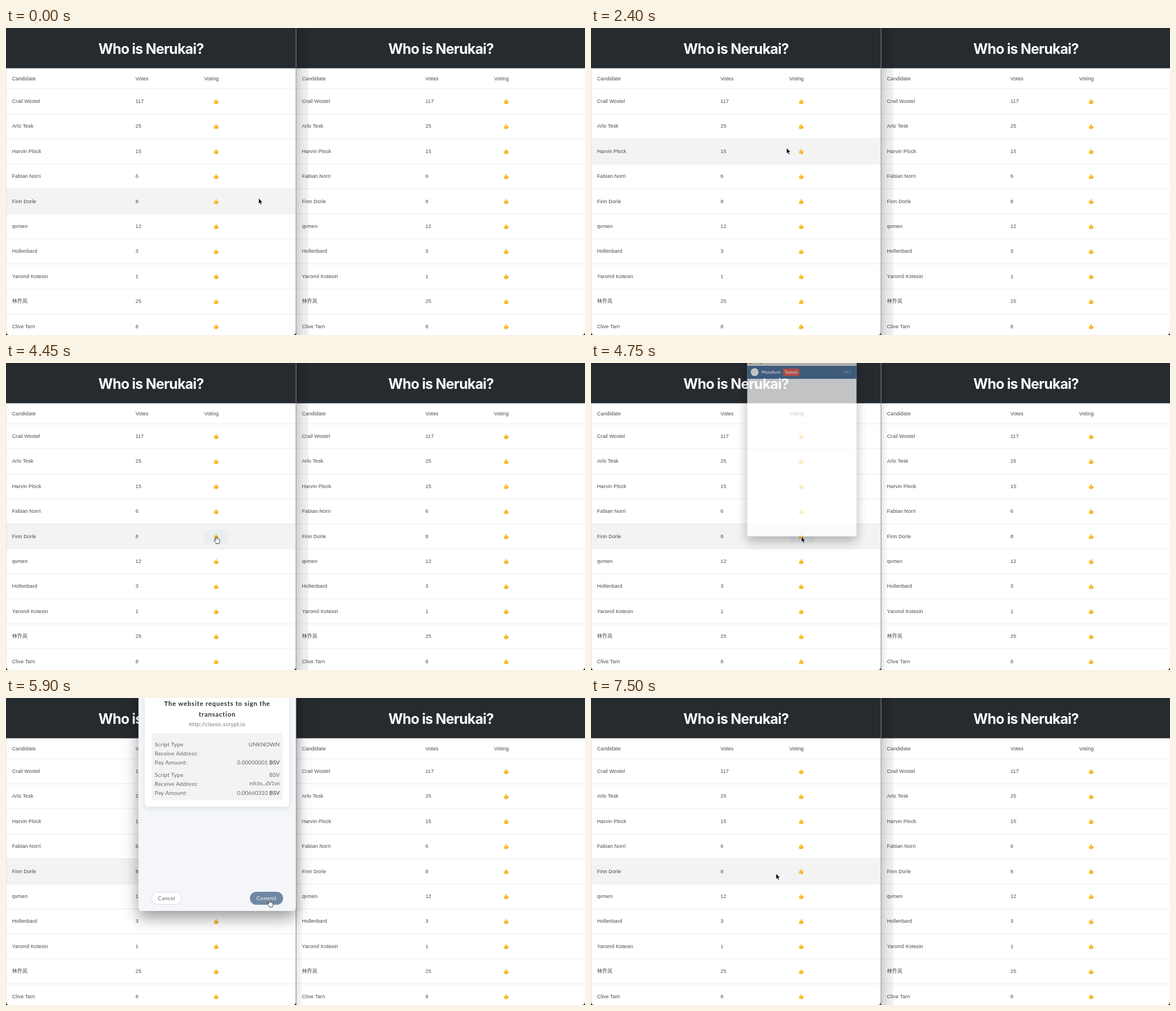
Recreate the animation shown at these times as an HTML page. Size 1028 by 545 pixels, loop 8 s.

```html
<!DOCTYPE html>
<html lang="en">
<head>
<meta charset="utf-8">
<title>Voting demo</title>
<style>
html, body { margin: 0; width: 100%; height: 100%; overflow: hidden; background: #fff; }
svg { display: block; width: 100vw; height: 100vh; }
.title { font: 700 25px Inter, sans-serif; letter-spacing: -.8px; fill: #fff; text-anchor: middle; }
.cell { font: 9px "Liberation Sans", "Noto Sans CJK SC", "Noto Sans CJK", sans-serif; letter-spacing: .12px; fill: #484848; }
.pop { font: 10px Lato, sans-serif; letter-spacing: .2px; fill: #666; }
.pop .head { font-weight: 700; font-size: 11.5px; letter-spacing: .72px; fill: #2c2f36; }
.mid { text-anchor: middle; }
.end { text-anchor: end; letter-spacing: 0; }
#frame { filter: drop-shadow(0 12px 14px rgba(0, 0, 0, .4)); }
#card { filter: drop-shadow(0 3px 5px rgba(60, 70, 100, .13)); }
</style>
</head>
<body>
<svg viewBox="0 0 1028 545" preserveAspectRatio="none">
  <defs>
    <linearGradient id="shade">
      <stop offset="0" stop-opacity=".18"/>
      <stop offset=".5" stop-opacity=".09"/>
      <stop offset="1" stop-opacity=".05"/>
    </linearGradient>
    <g id="thumb" transform="translate(0 .3) scale(.9)">
      <path d="M-4.4-.3 Q-2.6-.8-1.4-2.6 Q-.5-4-.5-4.8 Q.9-5.2 1.2-3.6 Q1.2-2.2.8-1.1 H3.4 Q4.6-.9 4.2.3 Q4.8 1 4.1 1.9 Q4.4 2.8 3.6 3.3 Q3.6 4.6 2.2 4.6 H-1.5 Q-3 4.3-4.4 3.9Z" fill="#fdc02f"/>
      <path d="M.6.4H4M.6 2H3.9M.6 3.5H3.4M-4.2 3.9Q-2 4.6 2 4.7" fill="none" stroke="#e8921c" stroke-width=".6"/>
    </g>
  </defs>

  <rect width="1028" height="545" fill="#fff"/>
  <rect id="hover" width="514" height="44.4" fill="#f3f3f3"/>
  <rect id="focus" x="352.5" y="296.5" width="41.5" height="23" fill="#e8eef2"/>
  <g id="pages"></g>
  <rect id="cast" x="516" height="545" fill="url(#shade)"/>
  <path d="M.5 71.5V545" stroke="#dedede"/>
  <path d="M515 0V71.5" stroke="#6d7075" stroke-width="1.4"/>
  <path d="M515 71.5V545" stroke="#999" stroke-width="1.4"/>
  <path d="M0 539Q0 545 6 545H0ZM515 539Q515 545 509 545H515ZM1028 539Q1028 545 1022 545H1028Z" fill="#111"/>

  <g id="popup" class="pop">
    <rect id="frame" x="235.5" y="-84" width="279" height="462" rx="6" fill="#fff"/>
    <rect x="235.5" y="-84" width="279" height="30" rx="6" fill="#e4e4e4"/>
    <circle cx="243.5" cy="-66" r="4" fill="#f45d55"/>
    <circle cx="256.5" cy="-66" r="4" fill="#f6bd3b"/>
    <circle cx="269.5" cy="-66" r="4" fill="#43c645"/>
    <rect x="235.5" y="-57" width="279" height="33" fill="#486e9b"/>
    <circle cx="254.5" cy="-41" r="10" fill="#fff"/>
    <text x="272" y="-37" style="font-weight:700;font-size:11px;fill:#fff">Mondivet</text>
    <rect x="327" y="-50" width="42" height="19" rx="5" fill="#e8594f"/>
    <text x="348" y="-37" class="mid" style="font-weight:700;font-size:10px;fill:#fff">Testnet</text>
    <text x="500" y="-38" class="end" style="font-size:8px;fill:#c3d0df">0.2.2</text>
    <g id="form">
      <path d="M235.5-24H514.5V372Q514.5 378 508.5 378H241.5Q235.5 378 235.5 372Z" fill="#f4f6fa"/>
      <rect id="card" x="246.5" y="-14" width="256.5" height="207" rx="6" fill="#fff"/>
      <text x="375" y="14" class="head mid">The website requests to sign the</text>
      <text x="375" y="33" class="head mid">transaction</text>
      <text x="375" y="50" class="mid" fill="#777">http://classic.scrypt.io</text>
      <rect x="258.5" y="62" width="233" height="119.5" rx="3" fill="#f3f3f3"/>
      <g id="lines"></g>
      <rect x="258.5" y="344.5" width="53" height="22" rx="11" fill="#fff" stroke="#dcdee2"/>
      <text x="285" y="359" class="mid">Cancel</text>
      <rect x="433" y="344" width="59" height="23" rx="11.5" fill="#7088a4"/>
      <text x="462.5" y="359" class="mid" style="fill:#f4f6f9">Commit</text>
    </g>
  </g>

  <g id="ring">
    <circle id="wave" cx="373" cy="308" fill="#dfeafa" fill-opacity=".4" stroke="#7eaceb" stroke-width="2"/>
    <circle cx="373" cy="308" r="9.5" fill="#9fb0c6" fill-opacity=".45"/>
  </g>
  <g id="pointer">
    <path id="arrow" d="M0 0V10.4L2.3 8.3 3.9 11.9 5.7 11.1 4.1 7.6H7.3Z" fill="#000" stroke="#fff" stroke-width=".8"/>
    <path id="hand" d="M-1.3.9Q-.2-.8.9.9V4.2Q2 3.3 2.8 4.6 4 3.9 4.6 5.1 6.2 4.7 6.1 6.4V8.6Q5.9 10.2 5 11.2V12.7H-.6V11.5Q-2.6 9.4-4 7.2-4.4 5.4-2.7 5.8L-1.3 7Z" fill="#fff" stroke="#222" stroke-width=".9"/>
  </g>
</svg>
<script>
const $ = id => document.getElementById(id);
const clamp = v => Math.max(0, Math.min(1, v));
const span = (t, a, b) => clamp((t - a) / (b - a));
const smooth = p => p * p * (3 - 2 * p);
const show = (id, on) => $(id).setAttribute('opacity', Number(on));

const TOP = 108, ROW = 44.4;
const people = [
  ['Crail Wostel', 117], ['Arlo Tesk', 25], ['Harvin Plock', 15], ['Fabian Norri', 6],
  ['Finn Dorle', 8], ['qvmen', 12], ['Hollenbard', 3], ['Yaromil Kotesin', 1],
  ['林乔岚', 25], ['Clive Tarn', 8]
];

const cell = (x, y, s) => `<text class="cell" x="${x}" y="${y}">${s}</text>`;
const rule = y => `<path d="M0 ${y}H514" stroke="#ebebeb"/>`;

function page(x) {
  const rows = people.map(([name, votes], i) => {
    const y = 130 + i * ROW;
    return rule(TOP + i * ROW) + cell(10.7, y + 3, name) + cell(230, y + 3, votes) +
      `<use href="#thumb" x="373.3" y="${y}"/>`;
  });
  return `<g transform="translate(${x})"><rect width="515" height="71.5" fill="#262b30"/>
    <text class="title" x="257.5" y="45.5">Who is Nerukai?</text>` +
    cell(10.7, 93, 'Candidate') + cell(230, 93, 'Votes') + cell(352, 93, 'Voting') +
    rows.join('') + '</g>';
}
$('pages').innerHTML = page(0) + page(514.8);

const pay = n => n + ' <tspan fill="#333">BSV</tspan>';
$('lines').innerHTML = [
  [86, 'Script Type', 'UNKNOWN'],
  [102, 'Receive Address:', ''],
  [117.5, 'Pay Amount:', pay('0.00000001')],
  [140, 'Script Type', 'BSV'],
  [156, 'Receive Address:', '<tspan font-size="8.5" dy="-1.5">mfc6x...dV1on</tspan>'],
  [171.5, 'Pay Amount:', pay('0.00660310')]
].map(([y, a, b]) => `<text x="264" y="${y}">${a}</text><text class="end" x="486" y="${y}">${b}</text>`).join('');

// Pointer stops: time, x, y
const path = [
  [50, 448.5, 302], [300, 443.5, 280], [650, 443.5, 280], [850, 441.5, 275.5],
  [1000, 441.5, 275.5], [1250, 428, 262], [1450, 428, 262], [1650, 351, 183.5],
  [2250, 345, 205], [2300, 345, 205], [2900, 373.5, 308], [5100, 373.5, 308],
  [5700, 468, 358.5], [6600, 468, 358.5], [7050, 335, 340], [7300, 335, 340], [7500, 328.5, 311.5]
];

function pointerAt(t) {
  const i = path.findIndex(k => k[0] > t);
  if (i === 0) return path[0].slice(1);
  if (i < 0) return path[path.length - 1].slice(1);
  const [a, x, y] = path[i - 1], [b, u, v] = path[i];
  const p = smooth(span(t, a, b));
  return [x + (u - x) * p, y + (v - y) * p];
}

function draw(t) {
  const [x, y] = pointerAt(t);
  $('pointer').setAttribute('transform', `translate(${x} ${y})`);
  const hand = t > 2700 && t < 4600 || t > 5550 && t < 6000;
  show('hand', hand);
  show('arrow', !hand);

  // The hovered row stays put while the popup has the focus
  const row = t > 2900 && t < 6600 ? 4 : Math.floor((y - TOP) / ROW);
  $('hover').setAttribute('y', TOP + row * ROW);
  show('focus', t > 2700 && t < 6600);

  const grow = span(t, 3000, 3100), fade = span(t, 3150, 3600);
  $('wave').setAttribute('r', 12 + 6 * grow + 6 * fade);
  show('ring', t >= 3000 ? 1 - fade : 0);

  const scale = .4 + .6 * smooth(span(t, 4600, 4905));
  $('popup').setAttribute('transform', `translate(373 147) scale(${scale}) translate(-373 -147)`);
  show('popup', span(t, 4600, 4810) * (1 - span(t, 5930, 6130)));
  show('form', t >= 5100);

  // The left window casts a weaker shadow while the popup is in front
  const behind = t > 4600 && t < 6150;
  $('cast').setAttribute('width', behind ? 10 : 21);
  show('cast', behind ? .5 : 1);
}

function tick(now) {
  draw(now % 8000);
  requestAnimationFrame(tick);
}
draw(0);
requestAnimationFrame(tick);
</script>
</body>
</html>
```
